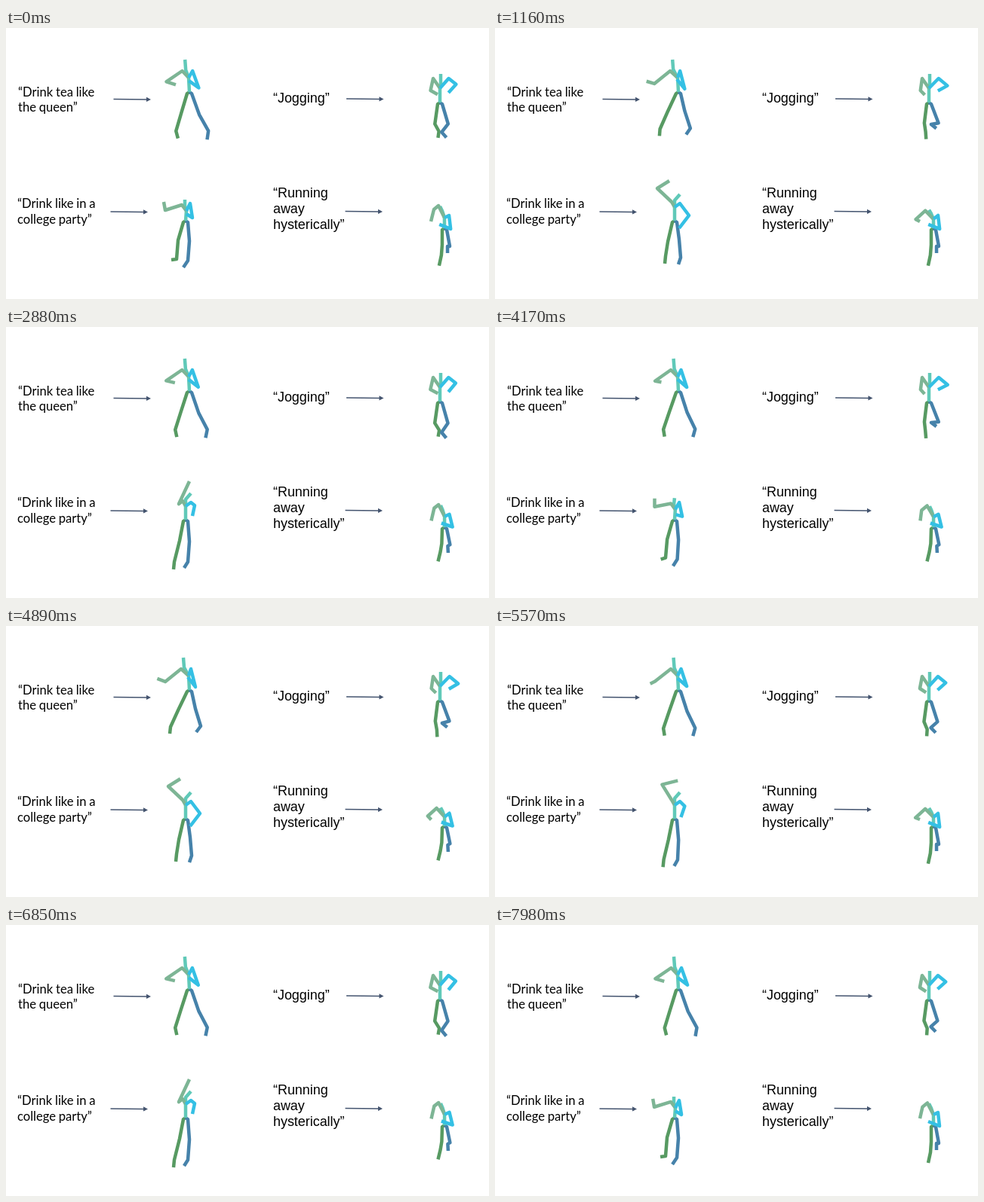
Write an HTML page that moves like this. It is 640 by 360 pixels and loops after 8 s.

```html
<!DOCTYPE html>
<html lang="en">
<head>
<meta charset="utf-8">
<title>Text to motion</title>
<style>
html, body { margin: 0; width: 100%; height: 100%; overflow: hidden; background: #fff; }
svg { display: block; width: 640px; height: 360px; }
.round { font: 16.6px Lato, Carlito, sans-serif; word-spacing: -.5px; -webkit-text-stroke: .2px #000; }
.plain { font: 17.9px "Liberation Sans", Arial, sans-serif; }
polyline { fill: none; stroke-width: 4.5; stroke-linejoin: round; }
</style>
</head>
<body>
<svg id="stage" viewBox="0 0 640 360">
  <defs>
    <g id="arrow" fill="#44546f" stroke="#44546f">
      <path d="M0 0L45 .5" stroke-width="1.5"/>
      <path d="M43.5 -2.7L49.5 .5L43.5 3.5Z" stroke="none"/>
    </g>
  </defs>
  <g class="round">
    <text x="16" y="90.5">“Drink tea like</text>
    <text x="16" y="111">the queen”</text>
    <text x="15" y="239">“Drink like in a</text>
    <text x="15" y="259.5">college party”</text>
  </g>
  <g class="plain">
    <text x="354" y="99">“Jogging”</text>
    <text x="354" y="224.5">“Running</text>
    <text x="354" y="246">away</text>
    <text x="354" y="267">hysterically”</text>
  </g>
  <use href="#arrow" x="142.5" y="94.5"/>
  <use href="#arrow" x="451" y="94"/>
  <use href="#arrow" x="138.5" y="244"/>
  <use href="#arrow" x="449.5" y="243.5"/>
</svg>
<script>
const LOOP = 8000, CLIP = 3970, TICK = 40, LAST = 59, MOVING_TICKS = 72;
const COLORS = { legR: '#579a62', legL: '#4682aa', spine: '#60c9b8', armR: '#7db595', armL: '#34c0e4' };

const swing = (s, peak, period) => .5 + .5 * Math.cos(2 * Math.PI * (s - peak) / period);
const ease = (s, from, to) => {
  const k = Math.min(1, Math.max(0, (s - from) / (to - from)));
  return k * k * (3 - 2 * k);
};

// Each figure has a rest pose, as x,y pairs outward along each limb
// (spine: pelvis to head), and moves that shift joints by a weight of the step.
const tea = {
  spine: [243, 85, 242, 66, 236, 55, 235, 42],
  armR: [232, 57, 211, 74, 200, 70],
  armL: [245, 57, 251, 81, 241, 68],
  legR: [228, 112, 218, 134, 217, 143],
  legL: [251, 110, 258, 133, 252, 141],
  moves: [
    { // sway
      weight: s => swing(s, 47, 57),
      spine: [0, 0, 0, 0, 3, 1, 3, 0],
      armR: [2, 0, 2, -1, 11, 13],
      armL: [3, 0, 6, -2, 2, 3],
      legR: [6, 1, 10, 4, 15, 5],
      legL: [7, 7, 14, 5, 20, 10]
    },
    { // sip
      weight: s => swing(s, 0, LAST) ** 3,
      armR: [0, 0, 0, -2, 17, -4]
    }
  ]
};

const jog = {
  spine: [575, 99, 575, 80, 576, 74, 576, 61],
  armR: [566, 67, 562, 83, 573, 88],
  armL: [586, 67, 595, 74, 586, 87],
  legR: [568, 128, 575, 137, 573, 145],
  legL: [585, 128, 577, 143, 583, 151],
  moves: [
    { // stride
      weight: s => swing(s, 5.2, 16),
      armR: [0, 0, 2, 0, -4, 1],
      armL: [2, 0, 5, 3, 1, -4],
      legR: [1, -2, -5, 1, -2, 3],
      legL: [3, -2, 1, -17, 2, -20]
    }
  ]
};

const party = {
  spine: [238, 256, 239, 243, 237, 236, 237, 228],
  armR: [233, 235, 211, 242, 209, 231],
  armL: [244, 233, 247, 252, 239, 247],
  legR: [228, 282, 226, 307, 219, 308],
  legL: [243, 283, 241, 309, 235, 318],
  moves: [
    { // raise the glass
      weight: s => ease(s, 0, 19),
      spine: [0, 0, -1, -5, 1, -7, 8, -7],
      armR: [1, -4, 4, -29, 22, -28],
      armL: [1, 0, 10, -3, 5, 19],
      legR: [1, 2, 0, -4, 6, 5],
      legL: [1, -2, 5, -4, 8, -4]
    },
    { // stretch
      weight: s => ease(s, 23, 37),
      armR: [0, 0, 8, -3, 14, 3],
      armL: [0, 0, -7, -12, 3, -15],
      legR: [1, 0, -3, 9, -3, 9],
      legL: [-1, 4, -5, 7, -7, 6]
    },
    { // drop the elbow
      weight: s => ease(s, 37, 47),
      armR: [0, 0, 6, 25, -2, -1]
    }
  ]
};

const run = {
  spine: [581, 266, 581, 252, 578, 243, 575, 237],
  armR: [573, 236, 567, 241, 563, 257],
  armL: [587, 249, 589, 267, 574, 261],
  legR: [578, 288, 577, 302, 574, 316],
  legL: [588, 290, 585, 290, 585, 299],
  moves: [
    { // crouch
      weight: s => Math.sin(Math.PI * s / LAST),
      spine: [0, 0, 0, 2, 0, 4, 0, 5],
      armR: [-3, 7, -10, 14, 0, 0]
    },
    { // leap
      weight: s => swing(s, 6.5, 10) ** 3,
      spine: [0, 0, 1, -2, 4, 0, 7, 0],
      armR: [1, 0, 3, -3, 4, 3],
      armL: [4, -2, 21, -12, 23, -4],
      legR: [-5, -2, -11, -29, -12, -37],
      legL: [3, -7, 3, 7, 7, 8]
    }
  ]
};

const stage = document.getElementById('stage');
const figures = [tea, jog, party, run];

for (const fig of figures) {
  fig.lines = {};
  for (const part in COLORS) {
    const line = document.createElementNS('http://www.w3.org/2000/svg', 'polyline');
    line.setAttribute('stroke', COLORS[part]);
    fig.lines[part] = stage.appendChild(line);
  }
}

// The clip plays a little slower than the tick grid, then holds its last step.
function stepAt(t) {
  const ticks = Math.floor(t % CLIP / TICK), shift = t < CLIP ? 0 : .45;
  return Math.min(LAST, Math.floor(ticks * LAST / MOVING_TICKS + shift));
}

function drawFigure(fig, step) {
  const weights = fig.moves.map(move => move.weight(step));
  const pose = {};
  for (const part in COLORS)
    pose[part] = fig[part].map((v, k) =>
      fig.moves.reduce((sum, move, m) => sum + (move[part] ? weights[m] * move[part][k] : 0), v));

  const [x, y, ...upper] = pose.spine, chest = upper.slice(0, 2);
  const roots = {
    legR: [x, y, x - 3, y + 2],
    legL: [x, y, x + 3, y + 2],
    spine: [],
    armR: chest,
    armL: chest
  };
  for (const part in COLORS)
    fig.lines[part].setAttribute('points', [...roots[part], ...pose[part]].join(' '));
}

function frame() {
  const step = stepAt(performance.now() % LOOP);
  figures.forEach(fig => drawFigure(fig, step));
  requestAnimationFrame(frame);
}
frame();
</script>
</body>
</html>
```
